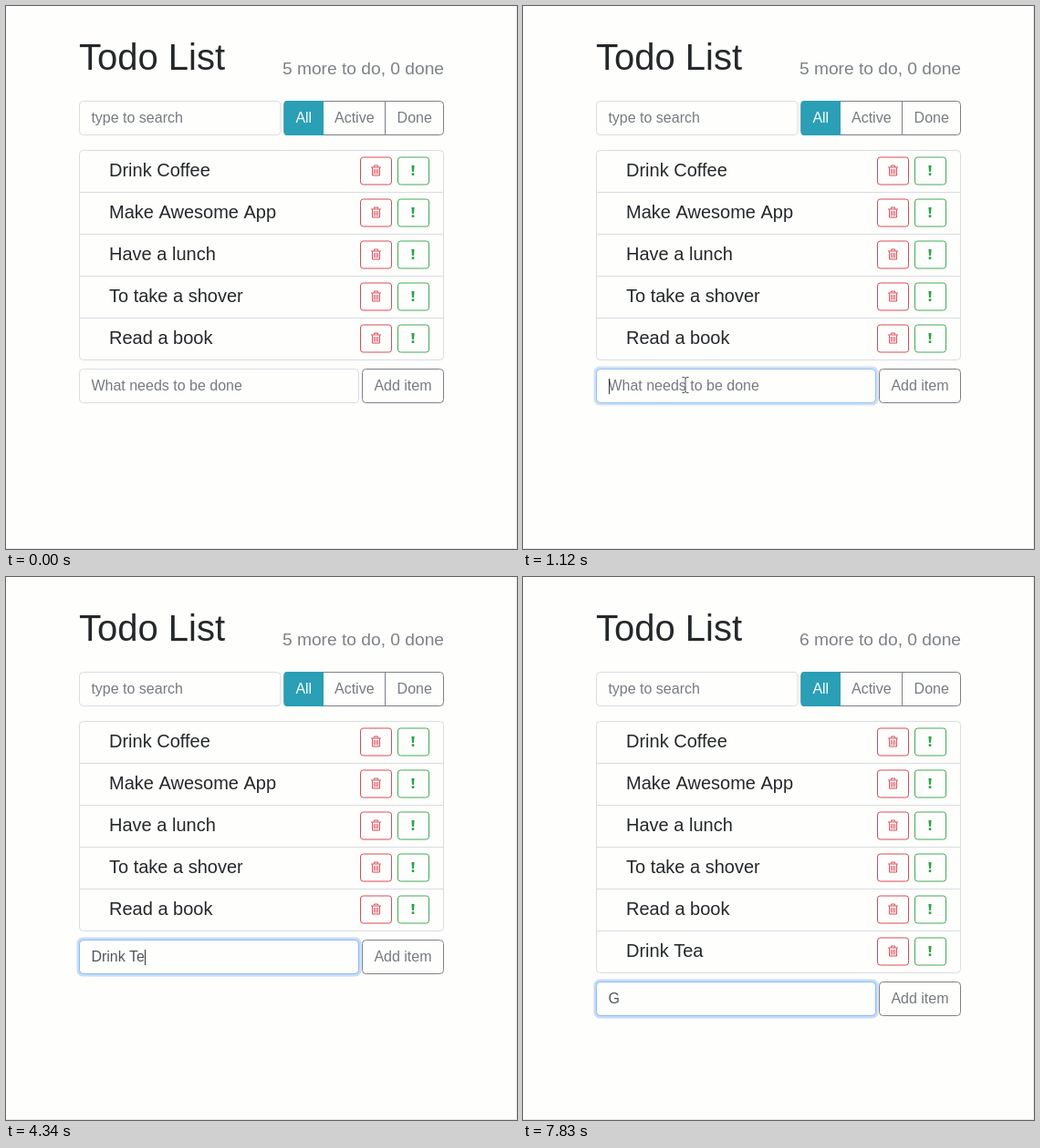
Recreate the animation shown at these times as an HTML page. Size 560 px wide and 596 px high, loop 8 s.

```html
<!DOCTYPE html>
<html lang="en">
<head>
<meta charset="utf-8">
<title>Todo List</title>
<style>
  html, body { margin: 0; width: 100%; height: 100%; overflow: hidden; background: #fefefc; }
  svg { display: block; width: 560px; height: 596px; font-family: "Liberation Sans", Arial, sans-serif; }
  rect, path { fill: none; }
  text { white-space: pre; }
  .gap { font-kerning: none; }
  .line { stroke: #dadce2; }
  .btn { stroke: #7b8187; }
  .hint { fill: #757b81; font-size: 16px; }
  .dark { fill: #24282b; }
  .red { stroke: #d64c5b; }
  .green { stroke: #43aa5a; }
</style>
</head>
<body>
<svg viewBox="0 0 560 596">
  <path d="M0 595.5H559.5V0" stroke="#e6e6e4"/>
  <text class="dark" x="80" y="70" font-size="40">Todo List</text>
  <text id="count" x="480" y="74.5" font-size="19.2" text-anchor="end" fill="#7c8287"></text>

  <rect class="line" x="80.5" y="104.5" width="220.5" height="37" rx="4"/>
  <text class="hint" x="93.4" y="128">type to search</text>
  <rect class="btn" x="304.9" y="104.5" width="174.6" height="37" rx="4"/>
  <path d="M348 104H308.4a4 4 0 0 0-4 4V138a4 4 0 0 0 4 4H348z" style="fill:#2a9fb5"/>
  <path class="btn" d="M415.5 104.5V141.5"/>
  <text x="317.4" y="128" font-size="16" fill="#fbfdfb">All</text>
  <text class="hint" x="360" y="128">Active</text>
  <text class="hint" x="428.6" y="128">Done</text>

  <rect id="list" class="line" x="80.5" y="158.5" width="399" rx="4"/>
  <g id="rows"></g>

  <g id="form">
    <rect id="halo" x="79" y="397" width="309" height="40" rx="5" stroke="#c6dcfb" stroke-width="3"/>
    <rect class="line" x="80.5" y="398.5" width="306" height="37" rx="4"/>
    <rect id="edge" x="80.5" y="398.5" width="306" height="37" rx="4" stroke="#8dbaf3"/>
    <text id="entry" x="93.4" y="422" font-size="16"></text>
    <path id="caret" stroke="#33373a"/>
    <rect class="btn" x="390.5" y="398.5" width="89" height="37" rx="4"/>
    <text class="hint" x="403.4" y="422">Add item</text>
  </g>

  <path id="beam" d="M-3.5-8.5H-1.5L0-7.5L1.5-8.5H3.5M0-7.5V7.5M-3.5 8.5H-1.5L0 7.5L1.5 8.5H3.5" stroke="#4a4a4a"/>
  <path id="arrow" d="M0 0V16L4 12.5L6.5 18L9 17L6.5 11.5H11.5z" style="fill:#222" stroke="#fff"/>
</svg>
<script>
const $ = id => document.getElementById(id);
const LOOP = 8000, ROW = 46, ADDED = 5620;
const items = ["Drink Coffee", "Make Awesome App", "Have a lunch", "To take a shover", "Read a book", "Drink Tea"];

// [time, typed text]
const typing = [
  [0, ""], [2550, "Dr"], [2860, "Dri"], [3010, "Drin"], [3170, "Drink"], [3380, "Drink "],
  [3620, "Drink T"], [4340, "Drink Te"], [4800, "Drink Tea"], [ADDED, ""], [6390, "G"]
];
// [time, caret visible]
const blink = [
  [0, 0], [930, 1], [1660, 0], [2210, 1], [4050, 0], [4340, 1], [5390, 0],
  [ADDED, 1], [6210, 0], [6390, 1], [6810, 0], [7230, 1], [7830, 0]
];

// Spaces get their own run so that kerning stays inside words.
const words = s => s.replace(/ /g, '<tspan class="gap"> </tspan>');

const row = (name, i) => `<g transform="translate(0 ${i * ROW})">
  ${i ? '<path class="line" d="M81 158.5H479"/>' : ""}
  <text class="dark" x="113" y="186.5" font-size="20">${words(name)}</text>
  <g transform="translate(0 -.5)">
    <rect class="red" x="388.5" y="166.5" width="34" height="30" rx="3"/>
    <path class="red" d="M400 177.5H411M403.5 177V175.5H407.5V177M401.5 178V186.5H409.5V178M403.5 179.5V185M405.5 179.5V185M407.5 179.5V185"/>
    <rect class="green" x="429.5" y="166.5" width="34" height="30" rx="3"/>
    <path style="fill:#2fa34a" d="M444.4 175.5H447.6L447 182.5H445zM444.7 183.8H447.3V186.4H444.7z"/>
  </g>
</g>`;
$("rows").innerHTML = items.map(row).join("");
const rows = [...$("rows").children];

const at = (keys, t) => keys.filter(k => k[0] <= t).pop()[1];
const clamp = x => Math.min(1, Math.max(0, x));
const show = (el, on) => el.setAttribute("visibility", on ? "visible" : "hidden");

function pointer(t) {
  const step = clamp((Math.floor((t - 50) / 53.6) + 1) / 12);
  const p = 1 - (1 - step) ** 2;
  const x = -4 + 182 * p, y = 456 - 40 * p;
  const inside = x > 81 && y < 436;
  const seen = t >= 50 && t < 3010;
  for (const id of ["beam", "arrow"]) {
    $(id).setAttribute("transform", `translate(${Math.round(x)} ${Math.round(y)})`);
    show($(id), seen && inside === (id === "beam"));
  }
}

function draw(t) {
  const n = t < ADDED ? 5 : 6;
  $("count").textContent = n + " more to do, 0 done";
  $("list").setAttribute("height", n * ROW);
  rows.forEach((r, i) => show(r, i < n));
  $("form").setAttribute("transform", `translate(0 ${(n - 5) * ROW})`);

  const focus = clamp((t - 950) / 200);
  $("halo").setAttribute("opacity", focus);
  $("edge").setAttribute("opacity", focus);

  const text = at(typing, t), entry = $("entry");
  entry.textContent = text || "What needs to be done";
  entry.setAttribute("fill", text ? "#4e555b" : "#757b81");
  const w = text ? entry.getComputedTextLength() : 0;
  $("caret").setAttribute("d", `M${Math.round(93.6 + w) + 0.5} 409V426`);
  show($("caret"), at(blink, t));
  pointer(t);
}

function tick() {
  draw(performance.now() % LOOP);
  requestAnimationFrame(tick);
}
tick();
</script>
</body>
</html>
```
